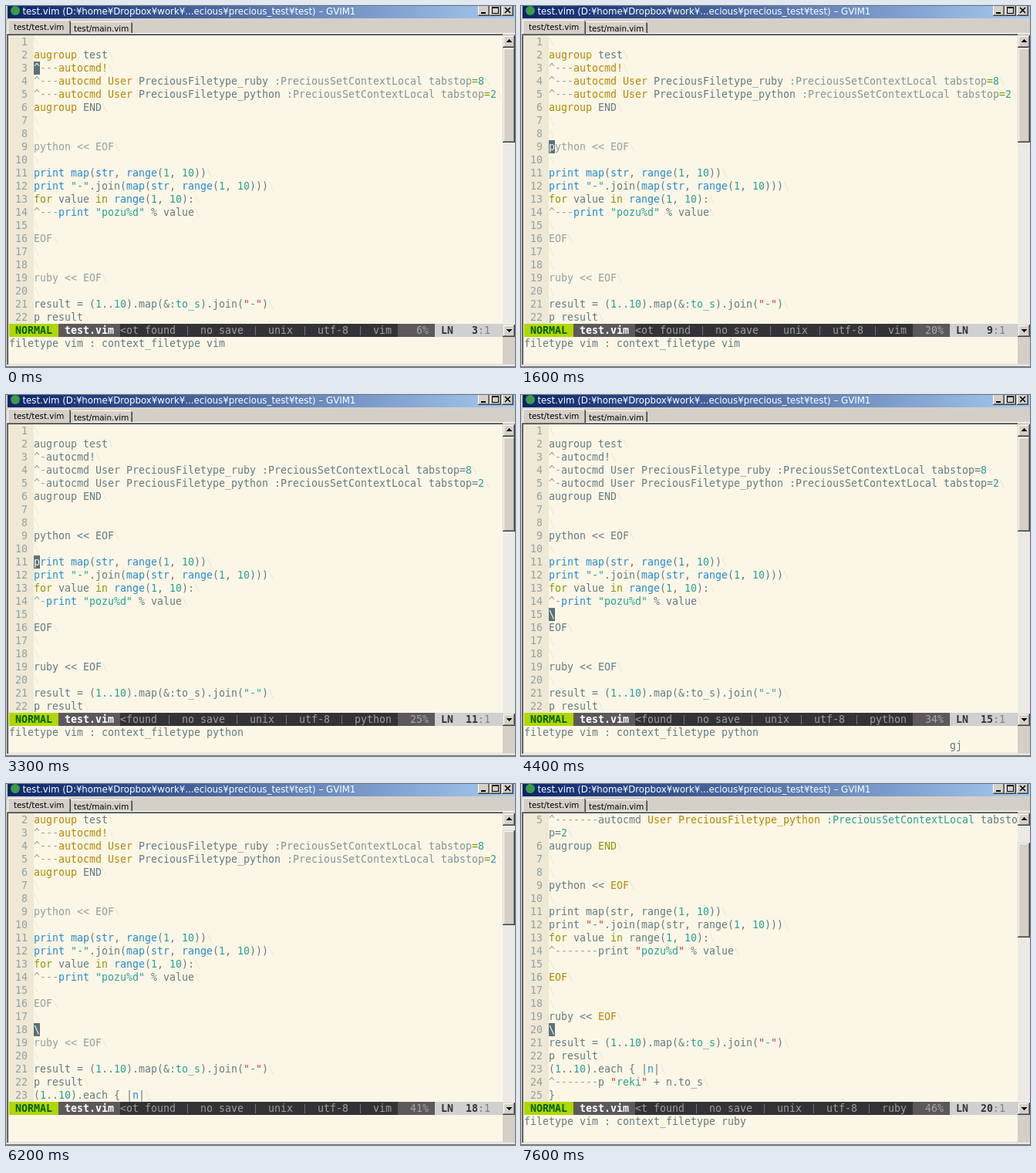
These frames come from a looping animation (660 by 468 pixels, 8000 ms). An HTML page with a canvas:

```html
<!DOCTYPE html>
<html lang="en">
<head>
<meta charset="utf-8">
<title>Editor: filetype by context</title>
<style>
html, body { margin: 0; width: 100%; height: 100%; overflow: hidden; }
canvas { display: block; }
</style>
</head>
<body>
<canvas id="stage" width="660" height="468"></canvas>
<script>
const ctx = document.getElementById('stage').getContext('2d');
const LOOP = 8000, CELL = 8, ROW = 17, LEFT = 4, TOP = 38, ROWS = 22, CODE_COLS = 76, TOTAL_LINES = 43;
const MONO = '13.288px "DejaVu Sans Mono", monospace';
const SANS = '"DejaVu Sans", sans-serif';

const color = {
  paper: '#fbf6e6', gutter: '#eee8d5', text: '#657b83', dim: '#93a1a1', soft: '#839496',
  yellow: '#b58900', green: '#859900', cyan: '#2aa198', blue: '#268bd2', red: '#dc322f',
  cursor: '#5c7078', face: '#d4d0c8', shade: '#808080', dark: '#404040',
};

const sections = [
  ['vim', ['', 'augroup test', '\tautocmd!',
    '\tautocmd User PreciousFiletype_ruby :PreciousSetContextLocal tabstop=8',
    '\tautocmd User PreciousFiletype_python :PreciousSetContextLocal tabstop=2',
    'augroup END', '', '']],
  ['heredoc', ['python << EOF']],
  ['python', ['', 'print map(str, range(1, 10))', 'print "-".join(map(str, range(1, 10)))',
    'for value in range(1, 10):', '\tprint "pozu%d" % value', '']],
  ['heredoc', ['EOF', '', '', 'ruby << EOF']],
  ['ruby', ['', 'result = (1..10).map(&:to_s).join("-")', 'p result',
    '(1..10).each { |n|', '\tp "reki" + n.to_s', '}']],
];
const lines = sections.flatMap(([lang, texts]) => texts.map(text => ({ lang, text })));

// Sticky patterns, tried in order at each position.
const syntax = {
  vim: [
    [/\b(augroup|autocmd!?|User)/y, color.yellow],
    [/:\w+ tabstop/y, color.soft],
    [/=/y, color.green],
    [/\b\d+/y, color.cyan],
  ],
  heredoc: [[/.+/y, color.dim]],
  python: [
    [/"[^"]*"/y, color.cyan],
    [/(?<!\.)\b(print|map|str|range)\b/y, color.blue],
    [/\b(for|in)\b/y, color.green],
    [/\b\d+(\.\.\d+)?/y, color.cyan],
  ],
  ruby: [
    [/"/y, color.red],
    [/(?<=")[^"]+(?=")/y, color.cyan],
    [/(?<=\|)\w+(?=\|)/y, color.blue],
    [/\b(for|in|END)\b/y, color.green],
    [/\b[A-Z]\w*/y, color.yellow],
    [/:\w+/y, color.cyan],
    [/\b\d+/y, color.cyan],
  ],
};
const tabWidth = { vim: 4, python: 2, ruby: 8 };

// When the cursor reaches each line, beginning with line 3.
const steps = [0, 500, 800, 1000, 1200, 1400, 1600, 2400, 3300, 3600, 3900, 4200,
  4400, 5100, 5900, 6200, 6600, 7600];
const pendingKeys = new Set([4, 8, 13, 15, 19]);

function rect(x, y, w, h, fill) {
  ctx.fillStyle = fill;
  ctx.fillRect(x, y, w, h);
}

function label(text, x, y, font, fill) {
  ctx.font = font;
  ctx.fillStyle = fill;
  ctx.fillText(text, x, y);
}

function put(text, col, row, fill, bold = false) {
  ctx.font = (bold ? 'bold ' : '') + MONO;
  ctx.fillStyle = fill;
  [...text].forEach((ch, i) => {
    if (ch !== ' ') ctx.fillText(ch, LEFT + (col + i) * CELL, TOP + row * ROW + 13);
  });
}

function block(col, row, width, fill) {
  rect(LEFT + col * CELL, TOP + row * ROW, width * CELL, ROW, fill);
}

// Raised box; outer and inner are the two upper-left edge lines.
function bevel(x, y, w, h, outer, inner) {
  rect(x, y, w, h, color.dark);
  rect(x, y, w - 1, h - 1, outer);
  rect(x + 1, y + 1, w - 2, h - 2, color.shade);
  rect(x + 1, y + 1, w - 3, h - 3, inner);
  rect(x + 2, y + 2, w - 4, h - 4, color.face);
}

const button = (x, y, w, h) => bevel(x, y, w, h, '#fff', color.face);
const scrollPart = (y, h) => bevel(644, y, 16, h, color.face, '#fff');

function arrow(x, y, dir) {
  for (let i = 0; i < 4; i++) rect(x - i, y + dir * i, 2 * i + 1, 1, '#000');
}

function highlight({ lang, text }, filetype) {
  const rules = syntax[filetype === 'vim' ? lang : filetype];
  const cells = [];
  const add = (str, fill) => { for (const ch of str) cells.push([ch, fill]); };
  for (let i = 0; i < text.length;) {
    if (text[i] === '\t') {
      add('^'.padEnd(tabWidth[filetype], '-'), color.dim);
      i++;
      continue;
    }
    let token = text[i], fill = color.text;
    for (const [pattern, hue] of rules) {
      pattern.lastIndex = i;
      const match = pattern.exec(text);
      if (match) { token = match[0]; fill = hue; break; }
    }
    add(token, fill);
    i += token.length;
  }
  add('\\', color.gutter);
  return cells;
}

function drawWindow() {
  rect(0, 0, 660, 468, color.face);
  const bar = ctx.createLinearGradient(2, 0, 658, 0);
  bar.addColorStop(0, '#0a246a');
  bar.addColorStop(1, '#a6caf0');
  rect(2, 0, 658, 16, bar);
  ctx.fillStyle = '#3c9a48';
  ctx.beginPath();
  ctx.arc(12, 6, 6, 0, 7);
  ctx.fill();
  label('test.vim (D:¥home¥Dropbox¥work¥...ecious¥precious_test¥test) – GVIM1',
    21.5, 11, '11.78px ' + SANS, '#fff');

  [612, 627, 643].forEach(x => button(x, -1, 15, 14));
  rect(616, 8, 6, 2, '#000');
  rect(630, 1, 9, 9, '#000');
  rect(631, 3, 7, 6, color.face);
  ctx.strokeStyle = '#000';
  ctx.lineWidth = 1.6;
  ctx.beginPath();
  ctx.moveTo(647, 2); ctx.lineTo(654, 9);
  ctx.moveTo(654, 2); ctx.lineTo(647, 9);
  ctx.stroke();

  rect(0, 35, 660, 1, '#fff');
  drawTab('test/main.vim', 83, 20, 81, 15, 88, 33);
  drawTab('test/test.vim', 2, 18, 82, 18, 10, 31);

  rect(1, 36, 643, 1, color.shade);
  rect(2, 37, 642, 1, color.dark);
  rect(1, 36, 1, 430, color.shade);
  rect(2, 37, 1, 428, color.dark);
  rect(3, TOP, 641, 426, color.paper);
  rect(1, 465, 659, 1, '#fff');
  rect(0, 467, 660, 1, color.shade);
}

function drawTab(text, x, y, w, h, textX, baseline) {
  rect(x, y, w, h, color.face);
  rect(x, y + 1, 1, h - 1, '#fff');
  rect(x + 1, y, w - 3, 1, '#fff');
  rect(x + w - 2, y + 1, 1, h - 1, color.shade);
  rect(x + w - 1, y + 2, 1, h - 2, color.dark);
  label(text, textX, baseline, '10.3px ' + SANS, '#000');
}

function drawScrollbar(top) {
  const size = 16, height = (ROWS + 1) * ROW, trackTop = TOP + size;
  const unit = (height - 2 * size) / (TOTAL_LINES + ROWS - 1);
  rect(644, TOP, size, height, '#eceae6');
  scrollPart(TOP, size);
  arrow(652, 43, 1);
  scrollPart(Math.round(trackTop + (top - 1) * unit), Math.round(ROWS * unit));
  scrollPart(TOP + height - size, size);
  arrow(652, 422, -1);
}

function drawCode(cursor, top, filetype) {
  rect(LEFT, TOP, 4 * CELL, ROWS * ROW, color.gutter);
  for (let row = 0, n = top; row < ROWS; n++) {
    put(String(n).padStart(3), 0, row, color.dim);
    const cells = highlight(lines[n - 1], filetype);
    if (n === cursor) {
      block(4, row, 1, color.cursor);
      cells[0][1] = color.paper;
    }
    cells.forEach(([ch, fill], i) =>
      put(ch, 4 + i % CODE_COLS, row + Math.floor(i / CODE_COLS), fill));
    row += Math.ceil(cells.length / CODE_COLS);
  }
}

function drawStatus(cursor, filetype) {
  const row = ROWS;
  block(0, row, 80, '#343236');
  block(0, row, 8, '#afd700');
  put('NORMAL', 1, row, '#005f00', true);
  block(8, row, 10, '#5c585c');
  put('test.vim', 9, row, '#fff', true);

  // Right-aligned details; the overflow on the left is cut at "<".
  const info = ['not found', 'no save', 'unix', 'utf-8', filetype].join(' |~ ');
  const visible = info.slice(-43);
  put('<', 18, row, '#9e9e9e');
  [...visible].forEach((ch, i) => {
    const col = 62 - visible.length + i;
    if (ch === '|') rect(LEFT + (col + 1) * CELL - 1, TOP + row * ROW + 3, 1, 12, '#5f7a7a');
    else if (ch !== '~') put(ch, col, row, '#9e9e9e');
  });

  block(63, row, 6, '#5c585c');
  put(String(Math.floor(cursor * 100 / TOTAL_LINES)).padStart(3) + '%', 64, row, '#a8a8a8');
  block(69, row, 11, '#d0d0d0');
  put('LN', 70, row, '#343236', true);
  put(String(cursor).padStart(3), 73, row, '#343236', true);
  put(':1', 76, row, '#808080');
}

function draw(time) {
  const cursor = 2 + steps.filter(start => start <= time).length;
  const top = cursor < 18 ? 1 : cursor < 20 ? cursor - 16 : 5;
  const filetype = cursor >= 20 ? 'ruby' : cursor >= 10 && cursor <= 15 ? 'python' : 'vim';
  drawWindow();
  drawScrollbar(top);
  drawCode(cursor, top, filetype);
  drawStatus(cursor, filetype);
  const cleared = cursor === 18 || cursor === 19;
  if (!cleared) put('filetype vim : context_filetype ' + filetype, 0, 23, color.text);
  if (pendingKeys.has(cursor)) put('gj', 69, 24, color.text);
}

const begin = performance.now();
function tick() {
  draw((performance.now() - begin) % LOOP);
  requestAnimationFrame(tick);
}
tick();
</script>
</body>
</html>
```
